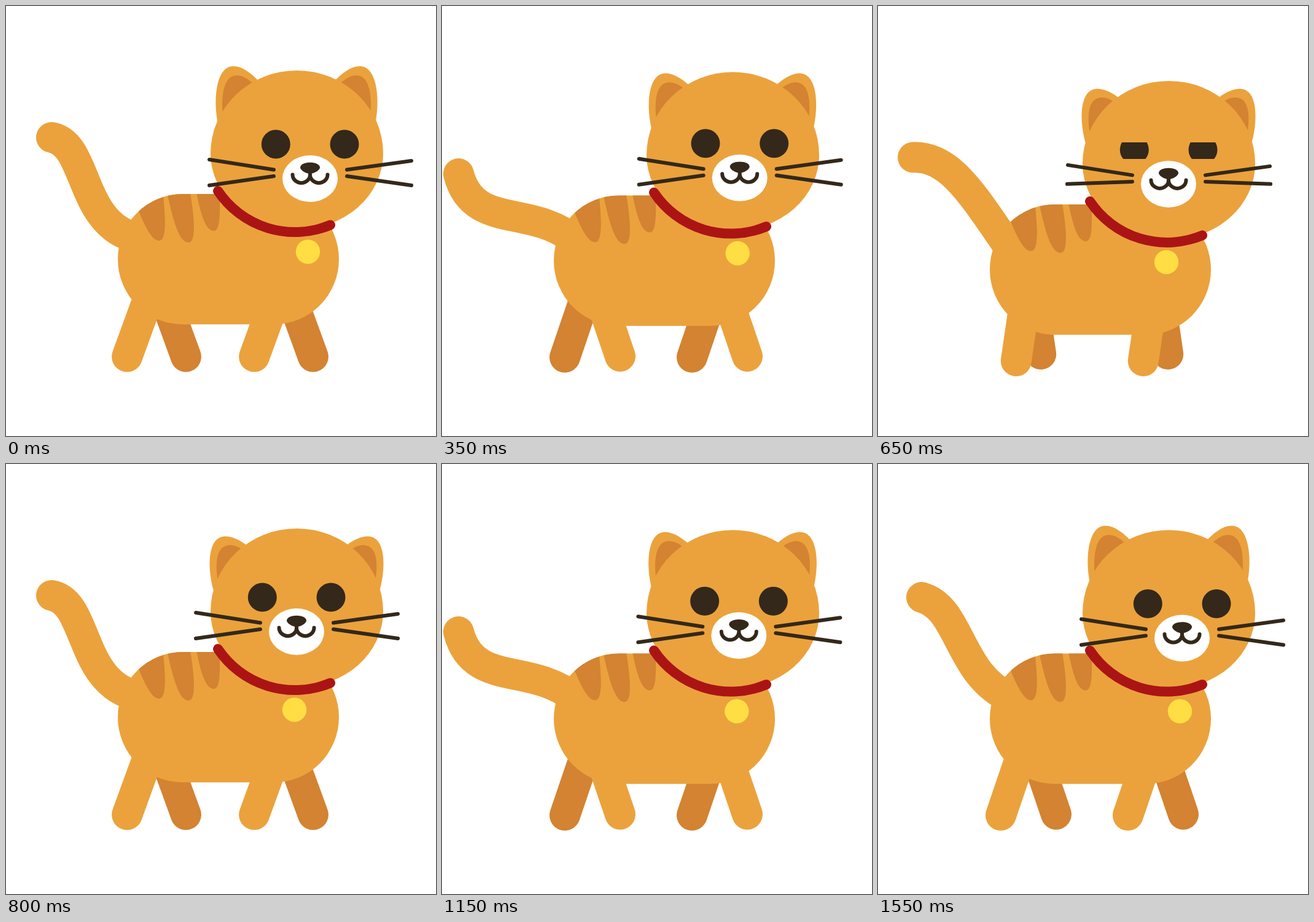
Write an HTML page that moves like this. It is 700x700 px and loops after 1.6 s.

```html
<!DOCTYPE html>
<html lang="en">
<head>
<meta charset="utf-8">
<title>Walking cat</title>
<style>
  html, body { margin: 0; width: 100%; height: 100%; overflow: hidden; background: #fff; }
  svg { display: block; width: 100%; height: 100%; }
  .fur { fill: #eba23c; }
  .shade { fill: #d38331; }
  .ink { fill: #33281a; }
  .leg, #tail { fill: none; stroke: #eba23c; stroke-width: 50; stroke-linecap: round; }
  .far .leg { stroke: #d38331; }
  .line { fill: none; stroke: #33281a; stroke-width: 6; stroke-linecap: round; }
</style>
</head>
<body>
<svg viewBox="0 0 700 700">
  <defs>
    <clipPath id="torso"><rect x="182" y="306" width="360" height="212.300" rx="106"/></clipPath>
    <clipPath id="lids"><rect id="eyeSlit" x="400" width="200"/></clipPath>
    <g id="ear">
      <path class="fur" d="M347 200C336 160 340 98 370 98C385 98 400 110 414 125L425 185Z"/>
      <path class="shade" d="M353 182C349 135 358 113 376 113C386 113 398 120 410 135L400 185Z"/>
    </g>
  </defs>

  <g class="far">
    <path class="leg" data-x="245" data-shift="400" d="M0 0V140"/>
    <path class="leg" data-x="452" data-shift="400" d="M0 0V140"/>
  </g>

  <g class="bob">
    <path id="tail"/>
    <rect class="fur" x="182" y="306" width="360" height="212.300" rx="106"/>
    <g class="shade" clip-path="url(#torso)">
      <path d="M211 322C222 348 235 382 249 382C263 382 259 338 255 300L220 300Z"/>
      <path d="M261 298C270 340 280 385 297 385C311 385 306 340 299 298Z"/>
      <path d="M309 298C316 335 324 366 338 366C350 366 348 335 348 298Z"/>
    </g>
  </g>

  <path class="leg" data-x="245" data-shift="0" d="M0 0V140"/>
  <path class="leg" data-x="452" data-shift="0" d="M0 0V140"/>

  <g class="bob">
    <g id="earLeft"><use href="#ear"/></g>
    <g id="earRight"><use href="#ear" transform="matrix(-1 0 0 1 946 0)"/></g>
    <path class="fur" d="M333 240A140.500 135 0 0 1 614 240A140.500 124 0 0 1 333 240Z"/>
    <path d="M345 301A150.500 150.500 0 0 0 528 356.500" fill="none" stroke="#ab1414" stroke-width="16" stroke-linecap="round"/>
    <circle id="tag" cx="491.500" cy="400" r="19.700" fill="#ffde43"/>
    <g id="face">
      <g class="ink" clip-path="url(#lids)">
        <circle cx="439.300" cy="225" r="23.500"/>
        <circle cx="551" cy="225" r="23.500"/>
      </g>
      <ellipse cx="495" cy="281" rx="45" ry="38" fill="#fff"/>
      <path class="ink" d="M479 263C479 252 511 252 511 263C511 267 502 273 495 273C488 273 479 267 479 263Z"/>
      <path class="line" d="M466.500 274.500A14.250 13.500 0 0 0 495 274.500A14.250 13.500 0 0 0 523.500 274.500M495 270V275"/>
      <path class="line" d="M331 250L436 266.500M660 252L555 266.500"/>
      <path id="whiskerLeft" class="line" d="M331 292L436 277"/>
      <path id="whiskerRight" class="line" d="M660 292L555 277"/>
    </g>
  </g>
</svg>
<script>
const LOOP = 1600, STRIDE = 800, STEP = 50;
const $ = id => document.getElementById(id);
const bobbing = document.querySelectorAll('.bob');
const legs = document.querySelectorAll('.leg');

// Tail poses over one stride: time, then the tip and two curve handles.
const tailPoses = [
  [0, 74, 214, 135, 224, 118, 358],
  [150, 57, 230.5, 78, 310, 119, 360],
  [350, 27, 270.6, 50, 362, 144, 320],
  [450, 24.5, 270.5, 66, 322, 158, 314],
  [550, 38, 254.5, 100, 275, 167, 319],
  [650, 57, 229.5, 119, 227, 157, 295],
  [750, 71, 214.6, 135, 232, 130, 340]
];

const move = (el, value) => el.setAttribute('transform', value);
const clamp = v => Math.min(1, Math.max(0, v));

// Cubic ease-in-out with handles at .42 and .58.
function ease(x) {
  let lo = 0, hi = 1;
  for (let i = 0; i < 24; i++) {
    const s = (lo + hi) / 2, r = 1 - s;
    if (1.26 * s * r * r + 1.74 * s * s * r + s * s * s < x) lo = s; else hi = s;
  }
  return lo * lo * (3 - 2 * lo);
}
const ramp = (t, from, to) => ease(clamp((t - from) / (to - from)));
const pulse = (t, from, to) => ease(clamp(1 - Math.abs(2 * (t - from) / (to - from) - 1)));

function poseAt(index) {
  const n = tailPoses.length, pose = tailPoses[(index + n) % n].slice();
  pose[0] += Math.floor(index / n) * STRIDE;
  return pose;
}

// Smooth periodic interpolation through the tail poses.
function tailPath(t) {
  let i = tailPoses.length - 1;
  while (tailPoses[i][0] > t) i--;
  const [a, b, c, d] = [-1, 0, 1, 2].map(k => poseAt(i + k));
  const span = c[0] - b[0], u = (t - b[0]) / span, v = 1 - u;
  const points = b.slice(1).map((value, k) => {
    const j = k + 1;
    const slopeB = (c[j] - a[j]) / (c[0] - a[0]) * span;
    const slopeC = (d[j] - b[j]) / (d[0] - b[0]) * span;
    return value * v * v * (1 + 2 * u) + slopeB * u * v * v
      + c[j] * u * u * (3 - 2 * u) - slopeC * u * u * v;
  });
  return `M${points.slice(0, 2)}C${points.slice(2)} 215 378`;
}

function poseLeg(leg, t) {
  const { x, shift } = leg.dataset;
  const phase = (t + Number(shift)) % STRIDE;
  const angle = 20 - 40 * pulse(phase, 0, STRIDE);
  const lift = 12.6 * pulse(phase, 0, STRIDE / 2);
  move(leg, `translate(${x} ${439.3 - lift}) rotate(${angle})`);
}

function draw(t) {
  const bob = 19.4 * pulse(t % 400, 0, 400);
  bobbing.forEach(el => move(el, `translate(0 ${bob})`));
  legs.forEach(leg => poseLeg(leg, t));
  $('tail').setAttribute('d', tailPath(t % STRIDE));

  const turn = ramp(t, 80, 640) - ramp(t, 880, 1440);
  move($('face'), `translate(${-22 * turn} ${-8 * turn})`);
  move($('tag'), `translate(${-22 * turn} 0)`);
  move($('earLeft'), `translate(0 ${7 * turn}) rotate(${-6.7 * turn} 473 240)`);
  move($('earRight'), `translate(0 ${7 * turn}) rotate(${6.7 * turn} 473 240)`);

  const blink = pulse(t, 600, 800);
  $('eyeSlit').setAttribute('y', 201 + 24 * blink);
  $('eyeSlit').setAttribute('height', 48 - 42 * blink);
  move($('whiskerLeft'), `rotate(${12 * blink} 436 277)`);
  move($('whiskerRight'), `rotate(${-12 * blink} 555 277)`);
}

const start = performance.now();
function tick() {
  const t = (performance.now() - start) % LOOP;
  draw(Math.floor(t / STEP) * STEP);
  requestAnimationFrame(tick);
}
tick();
</script>
</body>
</html>
```
